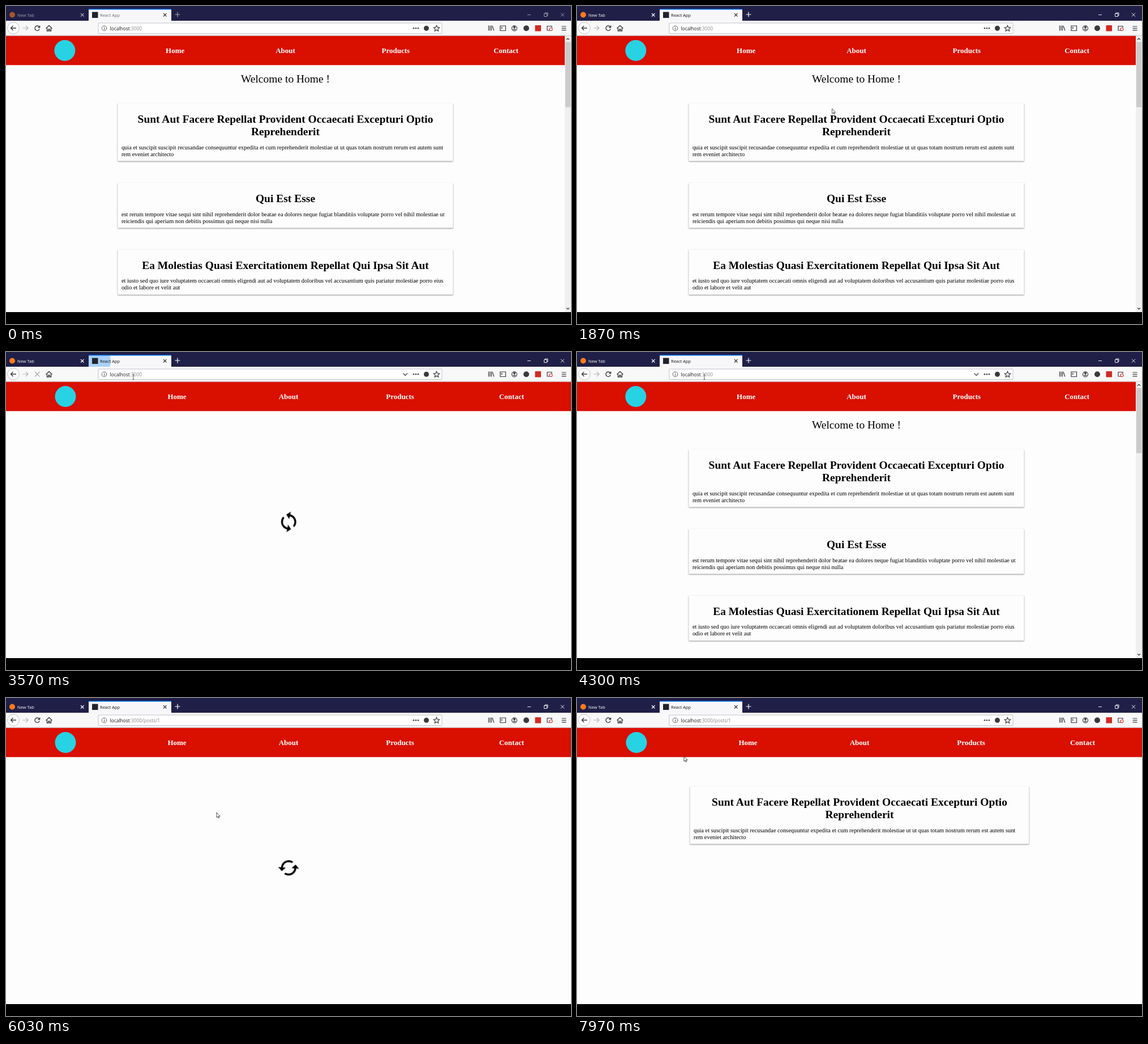
An HTML page that plays this animation: 998x561 px, repeating every 8000 ms.

```html
<!DOCTYPE html>
<html lang="en">
<head>
<meta charset="utf-8">
<title>React App</title>
<style>
html, body { margin: 0; width: 100%; height: 100%; overflow: hidden; background: #000; }
svg { display: block; width: 998px; height: 561px; }
text { white-space: pre; }
.ui { font-family: "Open Sans", "Noto Sans", sans-serif; }
.page { font-family: "Liberation Serif", "Times New Roman", serif; }
.nav { font-size: 13px; font-weight: bold; fill: #fff; text-anchor: middle; }
.welcome { font-size: 19.5px; text-anchor: middle; }
.head { font-size: 19.5px; font-weight: bold; text-anchor: middle; }
.body { font-size: 10.4px; }
.card { fill: #fdfdfd; filter: drop-shadow(0 1px 1px rgba(0, 0, 0, .45)); }
.line { fill: none; stroke: #3a3a3e; stroke-width: 1.2; }
.tab { font-size: 7.5px; }
.url { font-size: 8.4px; fill: #1a1a1a; }
.port { fill: #888; }

/* Scene switches: 1% is 80 ms */
.step { animation: 8s step-end infinite; }
.home { animation-name: home; }
.wide { animation-name: wide; }
.loader { animation-name: loader; }
.post { animation-name: post; }
.status { animation-name: status; }
.chrome { animation-name: wake; }
.focus { animation-name: focus; }
.chevron { animation-name: chevron; }
.stop { animation-name: busy; }
.reload { animation-name: idle; }
.dot { animation-name: dot; }
.hand { animation-name: hand; }
.arrow { animation-name: arrow; }
.beam { animation-name: beam; }
.path { animation-name: path; }
@keyframes home { 0%, 48.75% { visibility: visible } 40%, 70%, 100% { visibility: hidden } }
@keyframes wide { 0%, 48.75% { visibility: hidden } 41.25%, 70%, 100% { visibility: visible } }
@keyframes loader { 0%, 48.75%, 75.6%, 100% { visibility: hidden } 41.25%, 70% { visibility: visible } }
@keyframes post { 0% { visibility: hidden } 75.6%, 100% { visibility: visible } }
@keyframes status { 0%, 23%, 71.5%, 100% { visibility: hidden } 14%, 63.4% { visibility: visible } }
@keyframes wake { 0% { opacity: .6 } 3%, 100% { opacity: 1 } }
@keyframes focus { 0%, 36%, 100% { visibility: hidden } 30.5% { visibility: visible } }
@keyframes chevron { 0%, 55%, 100% { visibility: hidden } 28.3% { visibility: visible } }
@keyframes busy { 0%, 53%, 100% { visibility: hidden } 36% { visibility: visible } }
@keyframes idle { 0%, 53%, 100% { visibility: visible } 36% { visibility: hidden } }
@keyframes dot { 0%, 43%, 100% { visibility: hidden } 36% { visibility: visible } }
@keyframes path { 0%, 100% { visibility: hidden } 70% { visibility: visible } }
@keyframes hand { 0%, 22.8%, 70%, 100% { visibility: hidden } 6%, 60.6% { visibility: visible } }
@keyframes arrow { 0%, 28%, 60.6% { visibility: hidden } 22.8%, 55%, 70%, 100% { visibility: visible } }
@keyframes beam { 0%, 55%, 100% { visibility: hidden } 28% { visibility: visible } }

.cursor { animation: move 8s ease-in-out infinite; }
@keyframes move {
  0%, 6% { transform: translate(600px, 498px) }
  11%, 21% { transform: translate(511px, 217px) }
  28.5%, 30.5% { transform: translate(225px, 47px) }
  36%, 54% { transform: translate(225px, 44px) }
  62%, 88% { transform: translate(372px, 202px) }
  93.5% { transform: translate(202px, 104px) }
  99%, 100% { transform: translate(189px, 103px) }
}
.spin { animation: spin 2s linear infinite; }
@keyframes spin { from { transform: rotate(89deg) } to { transform: rotate(449deg) } }
.burst { animation: burst 8s linear infinite; transform-origin: 157px 16px; }
@keyframes burst {
  0%, 42.99% { transform: scale(0); opacity: 0 }
  43% { transform: scale(6); opacity: .55 }
  47%, 100% { transform: scale(60); opacity: 0 }
}
</style>
</head>
<body>
<svg viewBox="0 0 998 561">
  <defs>
    <clipPath id="tabClip"><path d="M146 5h146v21H146z"/></clipPath>
  </defs>

  <g class="page">
    <path fill="#fdfdfd" d="M0 52h998v488H0z"/>
    <g id="home" class="step home"></g>
    <g id="wide" class="step wide"></g>
    <g id="post" class="step post"></g>
    <g class="step loader">
      <g transform="translate(499.3 299.7)"><g class="spin">
        <path transform="scale(1.68) translate(-12 -12)" d="M12 4V1L8 5l4 4V6c3.31 0 6 2.69 6 6 0 1.01-.25 1.97-.7 2.8l1.46 1.46C19.54 15.03 20 13.57 20 12c0-4.42-3.58-8-8-8zm0 14c-3.31 0-6-2.69-6-6 0-1.01.25-1.97.7-2.8L5.24 7.74C4.46 8.97 4 10.43 4 12c0 4.42 3.58 8 8 8v3l4-4-4-4v3z"/>
      </g></g>
    </g>
  </g>

  <g class="step home">
    <path fill="#f0f0f0" d="M987 52h11v488h-11z"/>
    <path fill="#cbcbcb" d="M988 63.500h9v115h-9z"/>
    <path class="line" d="M990 59.500l2.500-2.500 2.500 2.500M990 532.500l2.500 2.500 2.500-2.500"/>
  </g>

  <g class="ui step status">
    <path fill="#f5f5f6" stroke="#dedee0" stroke-width=".7" d="M0 527h85v13H0z"/>
    <text x="2" y="536.500" font-size="7.5" fill="#888">localhost:3000/posts/1</text>
  </g>

  <g class="ui">
    <path fill="#1f1f47" d="M0 0h998v26H0z"/>
    <path fill="#f7f7f9" d="M146 5h146v21H146z"/>
    <g clip-path="url(#tabClip)"><circle class="burst" cx="157" cy="16" r="1" fill="#0a84ff"/></g>
    <path fill="#0a74e8" d="M146 5h146v1.600H146z"/>
    <g class="step chrome">
      <circle cx="11" cy="15.500" r="5" fill="#ff7a1a"/>
      <text class="tab" x="20" y="18.600" fill="#fff">New Tab</text>
      <path class="line" style="stroke:#fff" d="M132 13l5.500 5.500m0-5.500l-5.500 5.500M298.500 15h9M303 10.500v9"/>
      <path class="line" style="stroke:#fff;stroke-width:.9" d="M921 15.500h6M950.500 13.500h5v5h-5zM952 13.500v-1.500h5v5h-1.500M980 12.500l6 6m0-6l-6 6"/>
      <text class="tab" x="166" y="18.600" fill="#111">React App</text>
    </g>
    <path fill="#20232a" d="M152 10.500h10.500v10.500H152z"/>
    <g class="step dot"><path fill="#f7f7f9" d="M151 10h12v12h-12z"/><circle cx="157" cy="16" r="3" fill="#0a84ff"/></g>
    <path class="line" d="M278 13l5.500 5.500m0-5.500l-5.500 5.500"/>

    <path fill="#f8f8f9" d="M0 26h998v26H0z"/>
    <path fill="#c9c9cc" d="M0 51.600h998v1H0z"/>
    <circle cx="13" cy="39" r="10.300" fill="#fff" stroke="#b5b5ba" stroke-width=".8"/>
    <path class="line" style="stroke-width:1.400" d="M18 39H8.500m4-4l-4 4 4 4"/>
    <path class="line" style="stroke:#b2b2b5" d="M29.500 39H39m-4-4l4 4-4 4"/>
    <g class="step reload">
      <path class="line" style="stroke-width:1.400" d="M58.800 37a4.200 4.200 0 1 0 .4 3.400"/>
      <path fill="#3a3a3e" d="M60.300 34v4.600h-4.600z"/>
    </g>
    <g class="step stop"><path class="line" style="stroke:#aaa" d="M51 35l8.500 8.500m0-8.500L51 43.500"/></g>
    <path class="line" style="stroke-width:1.400" d="M70.500 39.500l5.500-5 5.500 5M72.500 39v5h2.500v-3h2v3h2.500v-5"/>

    <rect x="163" y="30" width="607" height="18.500" rx="1" fill="#fff" stroke="#bfbfce"/>
    <rect class="step focus" x="163" y="30" width="607" height="18.500" rx="1" fill="#fff" stroke="#4593e6" stroke-width="1.200"/>
    <circle class="line" style="stroke-width:.8" cx="173.500" cy="39.300" r="4.300"/>
    <path class="line" style="stroke-width:.9" d="M173.500 38.500v3.500M173.500 36.600v1"/>
    <text class="url" x="183.500" y="42.600">localhost<tspan class="port">:3000</tspan><tspan class="port step path">/posts/1</tspan></text>
    <g class="step focus">
      <path fill="#0078d7" d="M183.500 33.500H241v12h-57.500z"/>
      <text class="url" style="fill:#fff" x="183.500" y="42.600">localhost:3000</text>
    </g>
    <g class="step chevron"><path class="line" d="M701.500 37.500l3.800 3.800 3.800-3.800"/></g>
    <g fill="#3a3a3e">
      <circle cx="720" cy="39.300" r="1.300"/><circle cx="724" cy="39.300" r="1.300"/><circle cx="728" cy="39.300" r="1.300"/>
      <circle cx="742.500" cy="39.300" r="4.500"/><circle cx="919" cy="39.300" r="5"/>
    </g>
    <path class="line" d="M760.500 34.300l1.500 3.400 3.700.4-2.800 2.500.8 3.600-3.200-1.900-3.200 1.900.8-3.600-2.800-2.500 3.700-.4z"/>
    <path class="line" d="M852.500 34.500v9M855 34.500v9M857.500 34.500v9M859 35l3 8.500"/>
    <path class="line" d="M873 35h9.500v8.500H873zM874.500 37.500h2.500M874.500 39.500h2.500"/>
    <circle class="line" cx="898" cy="39.300" r="4.500"/>
    <path fill="#3a3a3e" d="M896 37.500a2 2 0 1 1 4 0a2 2 0 0 1-4 0zM895 42a3.200 2.500 0 0 1 6 0z"/>
    <path fill="#d42a22" d="M934.500 34h10.500v10.500h-10.500z"/>
    <path class="line" d="M963 43h-7v-7.500h8v2.500"/>
    <circle cx="962.500" cy="41" r="2.500" fill="#fff" stroke="#d8343a" stroke-width="1.200"/>
    <path class="line" d="M981.500 36h8M981.500 39.300h8M981.500 42.600h8"/>
  </g>

  <path d="M0 540h998v21H0z"/>

  <g class="cursor" stroke="#222" stroke-width=".8" fill="#fff" stroke-linejoin="round">
    <path class="step arrow" d="M0 0v8.800l2-1.800 1.400 3 1.300-.6-1.300-2.900h2.700z"/>
    <path class="step hand" d="M0 1a1 1 0 0 1 2 0v3.500l4 .9q1 .3.9 1.400l-.7 3.200-.7 1.800H.8L-2.300 7.700q-.8-1.300.5-1.500L0 7.500z"/>
    <path class="step beam" fill="none" stroke="#333" d="M-1.500-4h1l.5.400.5-.4h1M0-3.600v7.700M-1.500 4.500h1l.5-.4.5.4h1"/>
  </g>
</svg>
<script>
const $ = id => document.getElementById(id);
const text = (kind, x, y, words) => `<text class="${kind}" x="${x}" y="${y}">${words}</text>`;

function header(width) {
  const column = i => width * (0.5 + 0.1974 * i);
  const links = ['Home', 'About', 'Products', 'Contact'];
  return `<path fill="#d90f00" d="M0 52.500h${width}v51.700H0z"/>
    <circle cx="${column(-2)}" cy="78.500" r="18.500" fill="#27d3e3"/>` +
    links.map((name, i) => text('nav', column(i - 1), 83, name)).join('');
}

function card(width, top, heads, lines) {
  const left = width * 0.2;
  const bodyTop = top + 58.500 + 22 * (heads.length - 1);
  const height = bodyTop + 21 - top;
  return `<rect class="card" x="${left}" y="${top}" width="${width * 0.6}" height="${height}" rx="1"/>` +
    heads.map((line, i) => text('head', width / 2, top + 34.300 + 22 * i, line)).join('') +
    lines.map((line, i) => text('body', left + 6.500, bodyTop + 12 * i, line)).join('');
}

const first = [
  ['Sunt Aut Facere Repellat Provident Occaecati Excepturi Optio', 'Reprehenderit'],
  ['quia et suscipit suscipit recusandae consequuntur expedita et cum reprehenderit molestiae ut ut quas totam nostrum rerum est autem sunt',
    'rem eveniet architecto']
];
const second = [
  ['Qui Est Esse'],
  ['est rerum tempore vitae sequi sint nihil reprehenderit dolor beatae ea dolores neque fugiat blanditiis voluptate porro vel nihil molestiae ut',
    'reiciendis qui aperiam non debitis possimus qui neque nisi nulla']
];
const third = [
  ['Ea Molestias Quasi Exercitationem Repellat Qui Ipsa Sit Aut'],
  ['et iusto sed quo iure voluptatem occaecati omnis eligendi aut ad voluptatem doloribus vel accusantium quis pariatur molestiae porro eius',
    'odio et labore et velit aut']
];

$('home').innerHTML = header(987) + text('welcome', 493.5, 135, 'Welcome to Home !') +
  card(987, 172, ...first) + card(987, 312, ...second) + card(987, 429.7, ...third);
$('wide').innerHTML = header(998);
$('post').innerHTML = card(998, 156, ...first);
</script>
</body>
</html>
```
